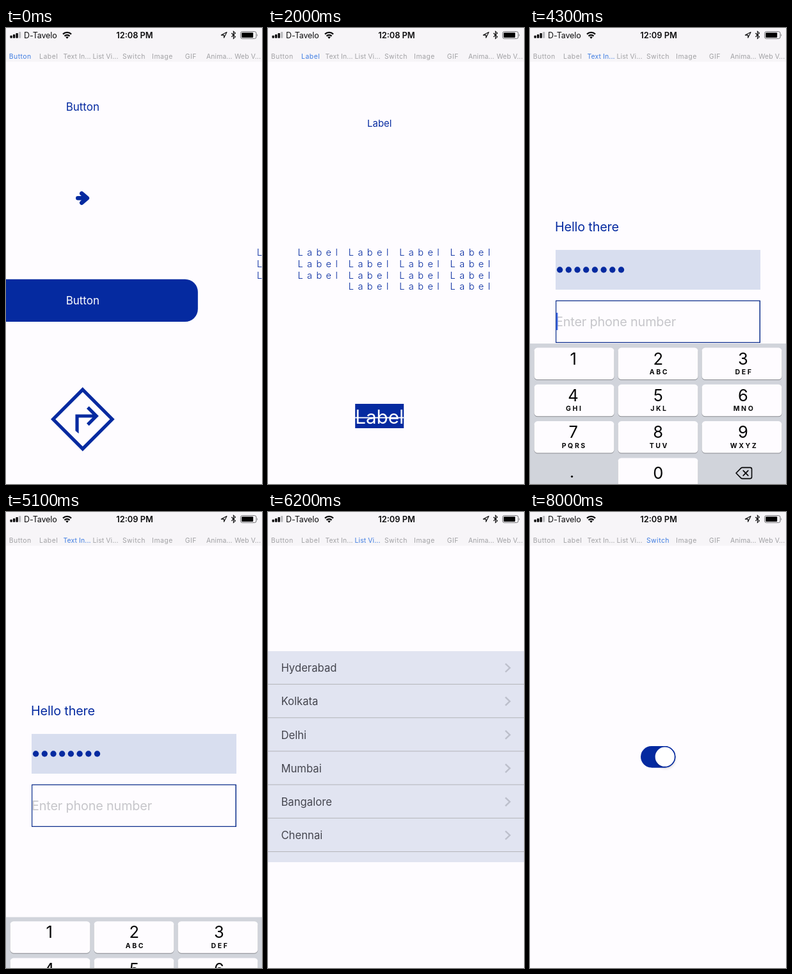
Write an HTML page that moves like this. It is 400 by 711 pixels and loops after 9100 ms.

```html
<!DOCTYPE html>
<html lang="en">
<head>
<meta charset="utf-8">
<title>Component pager</title>
<style>
  html, body { margin: 0; width: 100%; height: 100%; overflow: hidden; background: #fefcff; }
  svg { display: block; width: 100%; height: 100%; font-family: Inter, Roboto, sans-serif; }
</style>
</head>
<body>
<svg id="stage" viewBox="0 0 400 711">
  <defs>
    <filter id="soft" x="-40%" y="-40%" width="180%" height="180%">
      <feGaussianBlur stdDeviation="2"/>
    </filter>
  </defs>
  <rect width="400" height="711" fill="#fefcff"/>
  <g id="pages"></g>
  <g id="header">
    <rect width="400" height="52.5" fill="#f7f5f8"/>
    <g id="tabs"></g>
    <g id="bars"></g>
    <g fill="none" stroke="#0b0b0c">
      <g stroke-width="2.3">
        <path d="M89 9.6A9.3 9.3 0 0 1 102 9.6"/>
        <path d="M91.5 12.6A5.8 5.8 0 0 1 99.5 12.6"/>
      </g>
      <path d="M95.5 16.8L93.3 14.4A3 3 0 0 1 97.7 14.4Z" fill="#0b0b0c" stroke="none"/>
      <path d="M336.3 11.1L345 6.5L340.6 15.3V11.1Z" stroke-width="1.1" stroke-linejoin="round"/>
      <path d="M352.3 8L358.4 13.8L355.4 16.6V5.2L358.4 8L352.3 13.8" stroke-width="1.1"/>
      <rect x="366.6" y="5.6" width="24.4" height="11" rx="2.6" stroke-width="1" stroke="#6f6f72"/>
      <rect x="368.2" y="7.2" width="18" height="7.8" rx="1" fill="#000" stroke="none"/>
      <path d="M392.4 9.2Q394.2 11.1 392.4 13Z" fill="#6f6f72" stroke="none"/>
    </g>
  </g>
  <g id="keyboard"></g>
</svg>
<script>
const LOOP = 9100, STEP = 100, WIDTH = 400;
const BLUE = '#052aa0';
const KEYS_TOP = 481, KEYS_HEIGHT = 230;

const byId = id => document.getElementById(id);

function add(parent, tag, attrs = {}, content) {
  const node = document.createElementNS('http://www.w3.org/2000/svg', tag);
  for (const [name, value] of Object.entries(attrs)) node.setAttribute(name, value);
  if (content !== undefined) node.textContent = content;
  parent.append(node);
  return node;
}
const group = (parent, attrs) => add(parent, 'g', attrs);
const rect = (parent, x, y, width, height, fill, more) =>
  add(parent, 'rect', { x, y, width, height, fill, ...more });
const line = (parent, d, stroke, width, more) =>
  add(parent, 'path', { d, stroke, 'stroke-width': width, fill: 'none', ...more });
const write = (parent, content, x, y, size, fill, more) =>
  add(parent, 'text', { x, y, 'font-size': size, fill, ...more }, content);
const centered = { 'text-anchor': 'middle' };

// Header
const tabs = ['Button', 'Label', 'Text In...', 'List Vi...', 'Switch', 'Image', 'GIF', 'Anima...', 'Web V...']
  .map((name, i) => write(byId('tabs'), name, (i + 0.5) * WIDTH / 9, 48.4, 10.4, '#a1a1a4',
    { ...centered, 'letter-spacing': name.endsWith('...') ? 0.12 : 0.5 }));

for (let i = 0; i < 4; i++) {
  const height = 4 + i * 1.9;
  rect(byId('bars'), 6.4 + i * 4.5, 15.8 - height, 3.4, height, i < 3 ? '#0b0b0c' : '#bbbbbe', { rx: 0.8 });
}
write(byId('header'), 'D-Tavelo', 28, 15.6, 12.5, '#0b0b0c', { 'letter-spacing': -0.1 });
const clock = write(byId('header'), '', 201, 15.6, 12.8, '#0b0b0c', { ...centered, 'font-weight': 600 });

// Pages
const pages = byId('pages');
const page = i => group(pages, { transform: `translate(${i * WIDTH})` });

function buildButtons(p) {
  write(p, 'Button', 200, 129.2, 17, BLUE, centered);
  line(p, 'M192.5 265.3H206M198.5 258L207 265.3L198.5 272.6', BLUE, 6.6,
    { 'stroke-linecap': 'round', 'stroke-linejoin': 'round' });
  rect(p, 20, 391.7, 360, 66.3, BLUE, { rx: 20 });
  write(p, 'Button', 200, 431.2, 17, '#fff', centered);
  line(p, 'M200 563.8L246.2 610L200 656.2L153.8 610Z', BLUE, 5.2);
  line(p, 'M191.2 632V605H221M208 591.6L221.4 605L208 618.4', BLUE, 5.2);
  add(p, 'path', { d: 'M188 633V627.5L194 632.5V633Z', fill: '#fefcff' });
}

function buildLabels(p) {
  write(p, 'Label', 200, 154, 14.9, BLUE, centered);
  for (let row = 0; row < 4; row++)
    for (let col = row === 3 ? 1 : 0; col < 4; col++)
      write(p, 'Label', 72.2 + col * 79.4, 355 + row * 17.8, 14.6, BLUE,
        { 'letter-spacing': 6.4, 'font-weight': 300 });
  rect(p, 162, 586, 76, 38, BLUE);
  write(p, 'Label', 200, 616.5, 29.6, '#fff', centered);
  rect(p, 162, 606.7, 76, 1.8, '#fff');
}

function buildInputs(p) {
  const tight = { 'letter-spacing': -0.15 };
  write(p, 'Hello there', 39, 317, 19.8, BLUE, tight);
  rect(p, 40, 346, 320, 62, '#d8deef');
  for (let i = 0; i < 8; i++)
    add(p, 'circle', { cx: 46.6 + i * 13.7, cy: 377, r: 4.7, fill: BLUE });
  add(p, 'path', {
    d: 'M40 424.8H360V491H40ZM41.2 426V489.8H358.5V426Z',
    fill: '#0c2f8c', 'fill-rule': 'evenodd',
  });
  write(p, 'Enter phone number', 40, 465.2, 19.8, '#c6c6ca', tight);
  return rect(p, 41, 444, 2.4, 27, '#4169e1');
}

function buildList(p) {
  const rowHeight = 52.2;
  rect(p, 0, 217, WIDTH, 329, '#e1e4f1');
  ['Hyderabad', 'Kolkata', 'Delhi', 'Mumbai', 'Bangalore', 'Chennai'].forEach((city, i) => {
    const mid = 243 + i * rowHeight;
    write(p, city, 20.4, mid + 6.1, 16.7, '#45464f');
    line(p, `M371 ${mid - 6.5}L377.8 ${mid}L371 ${mid + 6.5}`, '#bcbfcb', 2.4);
    rect(p, 0, mid + 25, WIDTH, 1.1, '#b7b8bd');
  });
}

function buildSwitch(p) {
  rect(p, 173, 365, 54.4, 33.4, BLUE, { rx: 16.7 });
  add(p, 'circle', { cx: 211.5, cy: 385, r: 15, fill: '#000', opacity: 0.18, filter: 'url(#soft)' });
  line(p, 'M189.7 366H210.7A15.7 15.7 0 0 1 210.7 397.4H189.7', BLUE, 2);
  add(p, 'circle', { cx: 210.7, cy: 381.7, r: 15.1, fill: '#fff' });
}

buildButtons(page(0));
buildLabels(page(1));
const caret = buildInputs(page(2));
buildList(page(3));
buildSwitch(page(4));

// Number pad, drawn from its own top edge
const keyboard = byId('keyboard');
rect(keyboard, 0, 0, WIDTH, KEYS_HEIGHT, '#d1d4db');
const letters = ['', 'ABC', 'DEF', 'GHI', 'JKL', 'MNO', 'PQRS', 'TUV', 'WXYZ'];

function drawKey(col, row, digit, sub, baseline) {
  const x = 6.5 + col * 131, y = 6.5 + row * 57.3, mid = 67.6 + col * 132.6;
  rect(keyboard, x, y + 1, 125, 49.5, '#898b90', { rx: 5.3 });
  rect(keyboard, x, y, 125, 49.5, '#fefcff', { rx: 5.3 });
  write(keyboard, digit, mid, y + baseline, 25.5, '#060607', centered);
  write(keyboard, sub, mid + 1.7, y + 41.7, 10.5, '#060607',
    { ...centered, 'font-weight': 700, 'letter-spacing': 2.6 });
}
letters.forEach((sub, i) => drawKey(i % 3, Math.floor(i / 3), i + 1, sub, 26.2));
drawKey(1, 3, 0, '', 32.2);
add(keyboard, 'circle', { cx: 65.5, cy: 207.3, r: 1.6, fill: '#060607' });
line(keyboard, 'M322 202L329.5 194.4Q330.5 193.4 332 193.4H344Q346.5 193.4 346.5 195.9V208.1Q346.5 210.6 344 210.6H332Q330.5 210.6 329.5 209.6Z',
  '#060607', 1.6, { 'stroke-linejoin': 'round' });
line(keyboard, 'M333.2 198.2L340.8 205.8M340.8 198.2L333.2 205.8', '#060607', 1.7, { 'stroke-linecap': 'round' });

// Motion
const clamp = v => Math.max(0, Math.min(1, v));
const settle = x => x <= 0 ? 0 : 1 - (1 + x) * Math.exp(-x);

// Each swipe already has some travel (lead) when it first shows.
const swipes = [
  { at: 0, steps: 4, lead: 0.82 },
  { at: 2000, steps: 5, lead: 0.41 },
  { at: 5800, steps: 4, lead: 0.82 },
  { at: 7500, steps: 5, lead: 0.41 },
];
const RATE = 0.0145;

function swiped(t, { at, steps, lead }) {
  if (t < at) return 0;
  const span = steps * STEP;
  const travel = ms => settle(lead + ms * RATE);
  return travel(Math.min(t - at, span)) / travel(span);
}

function render(t) {
  const position = swipes.reduce((sum, s) => sum + swiped(t, s), 0);
  pages.setAttribute('transform', `translate(${-position * WIDTH})`);
  const active = Math.round(position);
  tabs.forEach((tab, i) => tab.setAttribute('fill', i === active ? '#3f7de2' : '#a1a1a4'));

  clock.textContent = t < 3900 ? '12:08 PM' : '12:09 PM';

  const shown = settle((t - 4060) * 0.02) - settle((t - 4988) * 0.02);
  const hidden = t < 4100 || t >= 5500;
  const top = hidden ? KEYS_TOP + KEYS_HEIGHT + 2 : KEYS_TOP + (1 - shown) * KEYS_HEIGHT;
  keyboard.setAttribute('transform', `translate(0 ${top})`);

  const visible = t >= 4100 && t < 5000;
  caret.setAttribute('opacity', visible ? 1 - clamp((t - 4500) / 300) : 0);
}

function tick() {
  const t = performance.now() % LOOP;
  render(Math.floor(t / STEP) * STEP);
  requestAnimationFrame(tick);
}
tick();
</script>
</body>
</html>
```
